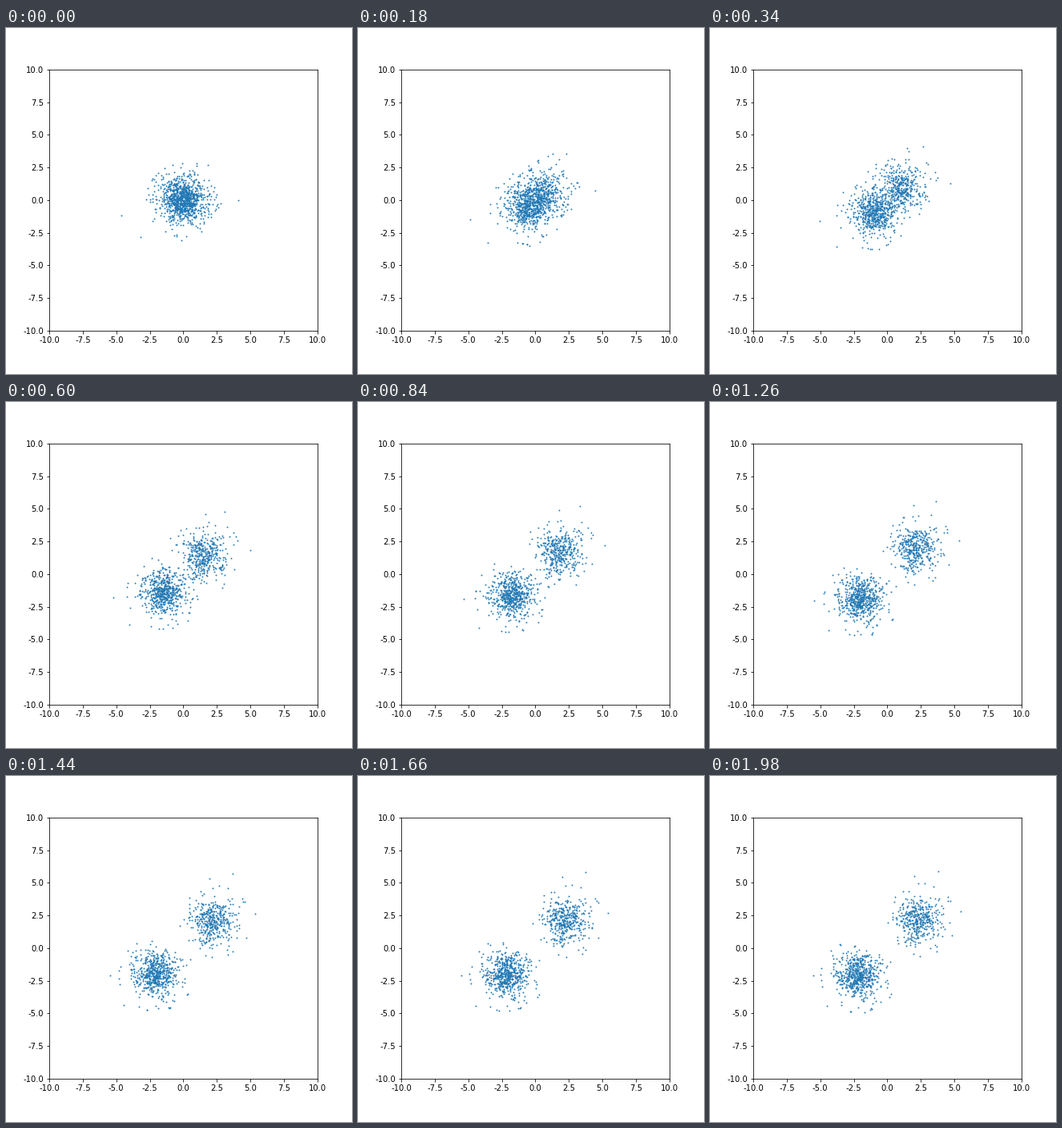
A matplotlib script that plays this animation: 432x432 px, repeating every 2 s.

```python
import numpy as np
import matplotlib.pyplot as plt
from matplotlib.animation import FuncAnimation

plt.rcParams["axes.unicode_minus"] = False
plt.rcParams["font.family"] = "DejaVu Sans"

FRAMES, COUNT = 100, 1000
MODES = np.array([[-2.25, -2.2], [2.4, 2.25]])
TAU = 30                # pull of the mode means
NOISE, COOL = 0.02, 28  # step size and its decay

# Far-flung particles: start and end
STRAY_START = np.array([[-4.65, -1.2], [4.1, 0], [-3.2, -2.85],
                        [-0.15, -3.05], [1, 2.8], [1.8, 2.7]])
STRAY_END = np.array([[-5.55, -2.15], [5.5, 2.9], [-4.55, -4.5],
                      [-1.2, -4.7], [2.05, 5.6], [3.85, 6]])


def pull(k):
    return 1 - np.exp(-k / TAU)


def limit(u, radius=2.8):
    r = np.hypot(u[:, 0], u[:, 1])[:, None]
    return u * np.minimum(1, radius / r)


def simulate():
    """Langevin-like drift of one Gaussian blob into two modes."""
    rng = np.random.default_rng(7)
    n = COUNT - len(STRAY_START)
    centre = MODES[(rng.random(n) < 0.4).astype(int)]
    spread = 0.86 * np.exp(0.2 * rng.standard_normal((n, 1)))
    u = rng.standard_normal((n, 2))
    path = np.empty((FRAMES, COUNT, 2))
    for k in range(FRAMES):
        path[k, :n] = limit(u * spread) + centre * pull(k)
        path[k, n:] = STRAY_START + (STRAY_END - STRAY_START) * pull(k)
        eps = NOISE * np.exp(-k / COOL)
        kick = rng.standard_normal((n, 2))
        u = np.sqrt(1 - eps) * u + np.sqrt(eps) * kick
    return path


path = simulate()

fig, ax = plt.subplots(figsize=(6, 6), dpi=72)
fig.subplots_adjust(left=0.125, right=0.9, bottom=0.125, top=0.88)
ticks = np.arange(-10, 10.1, 2.5)
ax.set(xlim=(-10, 10), ylim=(-10, 10), xticks=ticks, yticks=ticks)
dots = ax.scatter(*path[0].T, s=1, c="#1f77b4", linewidths=0.9)


def update(k):
    dots.set_offsets(path[k])
    return dots,


anim = FuncAnimation(fig, update, frames=FRAMES, interval=20, repeat=True)
plt.show()
```
